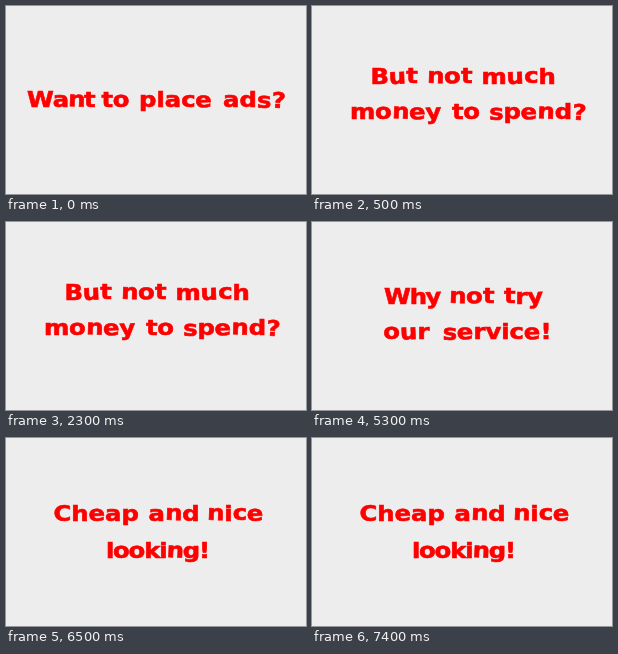
These frames come from a looping animation (300 by 188 pixels, 8 s). An HTML page:

```html
<!DOCTYPE html>
<html lang="en">
<head>
<meta charset="utf-8">
<title>Text slides</title>
<style>
  html, body { margin: 0; width: 100%; height: 100%; overflow: hidden; background: #ededed; }
  svg { display: block; width: 100%; height: 100%; }
  text {
    font: bold 21.5px "DejaVu Sans", Verdana, sans-serif;
    fill: #f00;
    stroke: #f00;
    stroke-width: 0.6px;
    white-space: pre;
  }
</style>
</head>
<body>
<svg id="stage" viewBox="0 0 300 188"></svg>
<script>
const LOOP = 8000;
const WIDEN = 1.13; // the lettering is broad and low

// Each line: baseline, then [left edge, word] pairs.
const slides = [
  { at: 0, lines: [
    [101.5, [21, "Want"], [95.5, "to"], [133, "place"], [217, "ads?"]]
  ] },
  { at: 500, lines: [
    [78, [58.5, "But"], [115, "not"], [169.5, "much"]],
    [113.5, [38, "money"], [140, "to"], [177, "spend?"]]
  ] },
  { at: 3500, lines: [
    [82, [72, "Why"], [137, "not"], [192, "try"]],
    [117.5, [71.5, "our"], [130.5, "service!"]]
  ] },
  { at: 6500, lines: [
    [83, [47.5, "Cheap"], [142.5, "and"], [201, "nice"]],
    [120.5, [100, "looking!"]]
  ] }
];

// Jaunty lettering: small lift and tilt per character.
const lift = { n: 1.2, o: 0.5, c: 0.5, a: 0.3, t: 0.6 };
const tilt = { n: 2, u: -2, o: -2, e: -2, s: 2, y: -2, "?": 3 };

const stage = document.getElementById("stage");

function make(tag, parent, attrs = {}) {
  const el = document.createElementNS("http://www.w3.org/2000/svg", tag);
  for (const key in attrs) el.setAttribute(key, attrs[key]);
  return parent.appendChild(el);
}

function drawLine(group, [base, ...words]) {
  const line = make("text", group, { transform: `scale(${WIDEN} 1)` });
  words.forEach(([x, word], i) => {
    const chars = [...word];
    const span = make("tspan", line, {
      x: x / WIDEN,
      y: chars.map(c => base - (lift[c] || 0)).join(" "),
      rotate: chars.map(c => tilt[c] || 0).join(" ")
    });
    if (/^W|^looking/.test(word)) span.style.letterSpacing = "-1px";
    span.textContent = word + (i < words.length - 1 ? " " : "");
  });
}

const groups = slides.map(slide => {
  const group = make("g", stage);
  slide.lines.forEach(line => drawLine(group, line));
  return group;
});

function tick() {
  const t = performance.now() % LOOP;
  const current = slides.filter(slide => slide.at <= t).length - 1;
  groups.forEach((group, i) => {
    group.style.display = i === current ? "" : "none";
  });
  requestAnimationFrame(tick);
}
tick();
</script>
</body>
</html>
```
